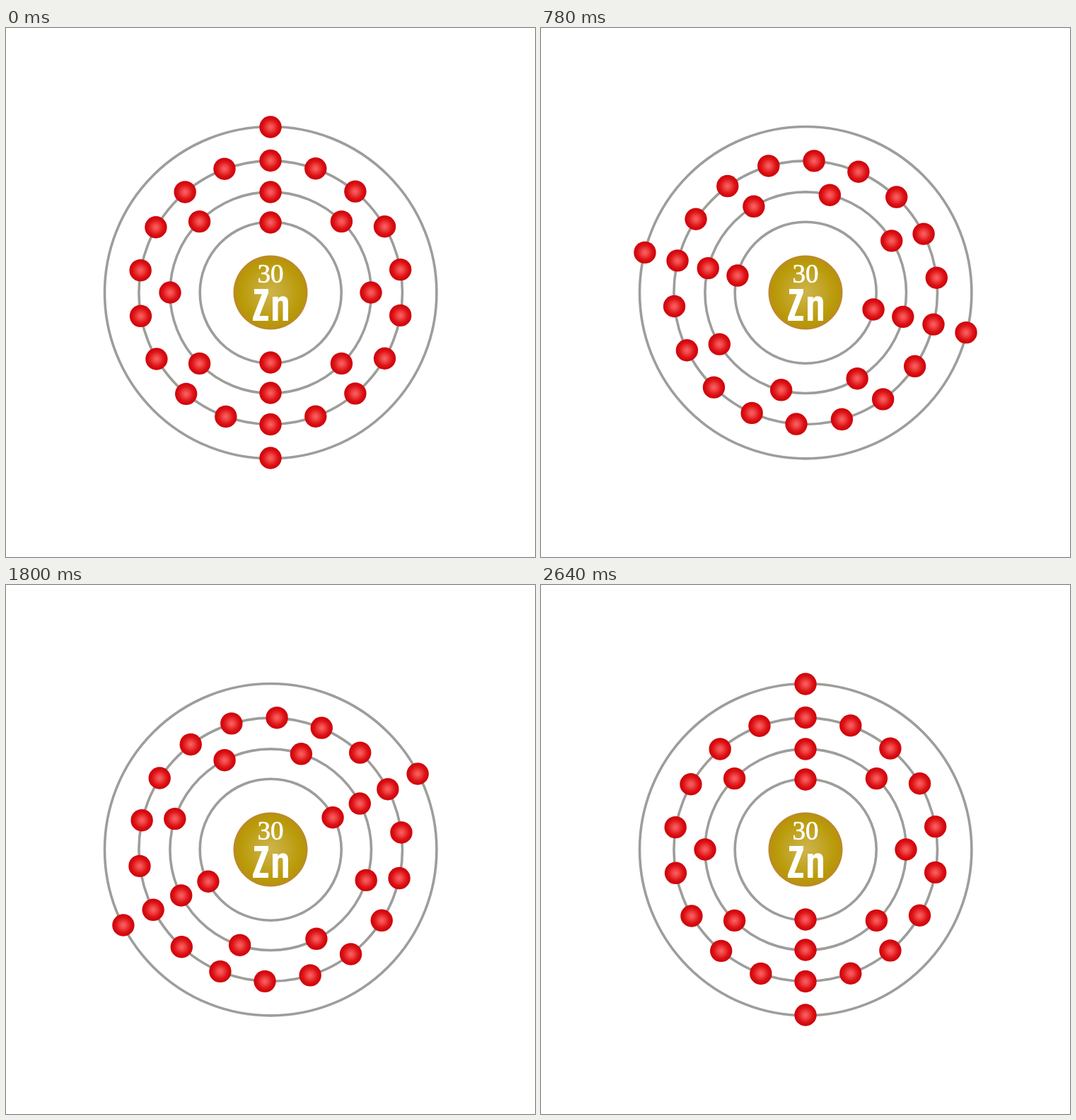
An HTML page with a canvas that plays this animation: 748 by 748 pixels, repeating every 2670 ms.

```html
<!DOCTYPE html>
<html lang="en">
<head>
<meta charset="utf-8">
<title>Zinc electron shells</title>
<style>
  html, body { margin: 0; width: 100%; height: 100%; overflow: hidden; background: #fff; }
  canvas { display: block; width: 748px; height: 748px; }
</style>
</head>
<body>
<canvas id="stage" width="748" height="748" role="img" aria-label="30 Zn"></canvas>
<script>
const ctx = document.getElementById('stage').getContext('2d');
const CENTER = 374;
const STEP_MS = 30;
const STEPS = 89;
const HALF_TURN_STEP = 45;
const FULL_TURN_STEP = 88;

const shells = [
  { ring: 100, orbit: 99, count: 2 },
  { ring: 142.3, orbit: 142, count: 8 },
  { ring: 186.3, orbit: 186.5, count: 18 },
  { ring: 234.7, orbit: 234, count: 2 }
];

function radial(radius, stops) {
  const gradient = ctx.createRadialGradient(0, 0, 0, 0, 0, radius);
  stops.forEach(([at, color]) => gradient.addColorStop(at, color));
  return gradient;
}

const electronFill = radial(15.7, [
  [0, '#fa6464'], [0.3, '#f04444'], [0.65, '#df1519'], [0.85, '#d3080e'], [1, '#cc070d']
]);
const nucleusFill = radial(52.5, [
  [0, '#cdb54c'], [0.45, '#c3a629'], [0.8, '#b99a08'], [0.93, '#b9930f'], [1, '#bb8630']
]);

function disc(x, y, radius, fill) {
  ctx.save();
  ctx.translate(x, y);
  ctx.fillStyle = fill;
  ctx.beginPath();
  ctx.arc(0, 0, radius, 0, Math.PI * 2);
  ctx.fill();
  ctx.restore();
}

// Condensed lettering, drawn because no installed face is this narrow.
const symbol = new Path2D(
  'M351 369H371V374.5L358.5 407H371V414H349V409.5L361.8 376.3H351Z' +
  'M377 380H384.5V383.2Q387 379.2 391.5 379.2Q399 379.2 399 388V414H391.5V389.5' +
  'Q391.5 385.8 388.6 385.8Q384.5 385.8 384.5 390.5V414H377Z'
);

function drawNucleus() {
  disc(CENTER, CENTER, 52.5, nucleusFill);
  ctx.fillStyle = ctx.strokeStyle = '#fff';
  ctx.lineWidth = 0.7;
  ctx.font = '37px "Liberation Serif", serif';
  ctx.textAlign = 'center';
  ctx.fillText('30', CENTER, 359.5);
  ctx.strokeText('30', CENTER, 359.5);
  ctx.fill(symbol);
}

function drawRing({ ring }) {
  ctx.strokeStyle = '#9d9d9b';
  ctx.lineWidth = 3.6;
  ctx.beginPath();
  ctx.arc(CENTER + 0.2, CENTER + 0.2, ring, 0, Math.PI * 2);
  ctx.stroke();
}

function drawElectrons({ orbit, count }, turn) {
  for (let i = 0; i < count; i++) {
    // The left half of the crowded shell lags very slightly.
    const lag = i > 9 ? 0.2 + 0.03 * (i - 10) : 0;
    const angle = (turn + i * 360 / count - lag) * Math.PI / 180;
    disc(CENTER + orbit * Math.sin(angle), CENTER - orbit * Math.cos(angle), 15.7, electronFill);
  }
}

// Two half turns, the second a little quicker.
function turnAt(step) {
  return step <= HALF_TURN_STEP
    ? 180 * step / HALF_TURN_STEP
    : 180 + 180 * (step - HALF_TURN_STEP) / (FULL_TURN_STEP - HALF_TURN_STEP);
}

function draw(now) {
  const turn = turnAt(Math.floor(now / STEP_MS) % STEPS);
  ctx.fillStyle = '#fff';
  ctx.fillRect(0, 0, 748, 748);
  shells.forEach(drawRing);
  drawNucleus();
  shells.forEach(shell => drawElectrons(shell, turn));
}

const start = performance.now();
function tick() {
  draw(performance.now() - start);
  requestAnimationFrame(tick);
}
tick();
</script>
</body>
</html>
```
